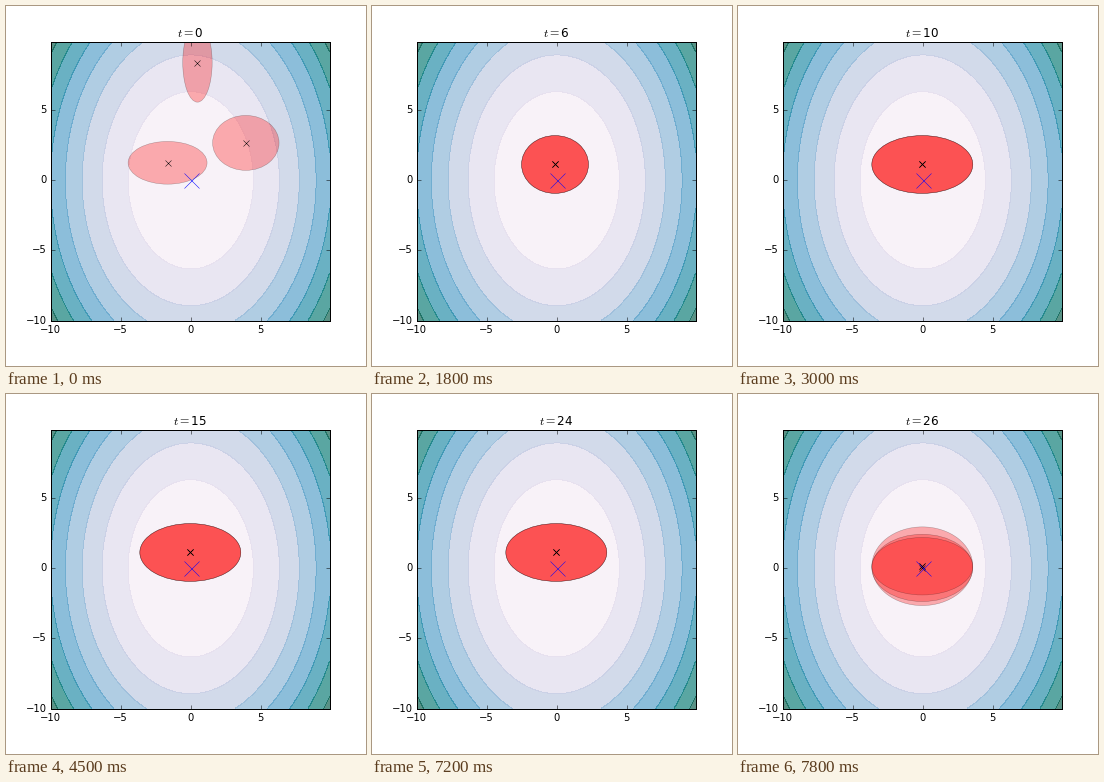
These frames come from a looping animation (360x360 px, 8000 ms). A matplotlib script:

```python
import numpy as np
import matplotlib.pyplot as plt
from matplotlib.animation import FuncAnimation
from matplotlib.patches import Ellipse

plt.style.use("classic")
plt.rcParams.update({
    "font.family": "DejaVu Sans",
    "font.size": 10,
    "savefig.dpi": "figure",
    "savefig.facecolor": "white",
})

STAGE = 360      # px
STEP_TICKS = 3   # animation ticks per iteration
INTERVAL = 100   # ms per tick
WIDEN_AT, DROP_AT = 8, 26

# Each particle: centre, size, and share of its offset kept per iteration
PARTICLES = [((-1.65, 1.25), (5.63, 3.05), 0.40),
             ((0.48, 8.40), (2.10, 5.65), 0.0),
             ((3.93, 2.67), (4.74, 3.92), 0.22)]
BEST, BEST_SIZE = np.array((-0.12, 1.13)), np.array((4.77, 4.12))


def particle(k, t):
    """Centre and size of particle k at iteration t."""
    centre, size, keep = PARTICLES[k]
    if t == 0:
        return centre, size
    if t >= DROP_AT:
        return (-0.03, 0.09 + 0.06 * (-1) ** k), (7.2, 4.1 * 1.17 ** (2 - k))
    if t >= WIDEN_AT:
        return (-0.03, BEST[1]), (7.2, BEST_SIZE[1])
    offset = (np.array(centre) - BEST) * keep ** t
    # Ellipses are flatter the further they are from the best one
    flatten = 1 + abs(offset[0]) * np.array((0.08, -0.24))
    return BEST + offset, BEST_SIZE * flatten


fig = plt.figure(figsize=(5, 5), dpi=72, facecolor="white")
# Just under half a pixel, so that ticks and markers round up and left
nudge = 0.48 / STAGE
ax = fig.add_axes([0.125 - nudge, 0.125 + nudge, 0.775, 0.775])

axis = np.arange(-10, 10, 0.1)
X, Y = np.meshgrid(axis, axis)
ax.contourf(X, Y, 2 * X**2 + Y**2, levels=np.arange(0, 321, 40),
            cmap="PuBuGn", vmin=0, vmax=320, alpha=0.65)
ax.set(xlim=(-10, 9.9), ylim=(-10, 9.9),
       xticks=range(-10, 6, 5), yticks=range(-10, 6, 5))

ellipses = [ax.add_patch(Ellipse((0, 0), 1, 1, facecolor="red",
                                 edgecolor="black", linewidth=0.5, alpha=0.3))
            for _ in PARTICLES]
centres = [ax.plot([], [], "kx", markersize=6)[0] for _ in PARTICLES]
ax.plot([0], [0], "bx", markersize=15)
title = ax.set_title("", fontsize=12)


def update(tick):
    t = tick // STEP_TICKS
    title.set_text(f"$t=${t}")
    for k, (ellipse, mark) in enumerate(zip(ellipses, centres)):
        (x, y), (w, h) = particle(k, t)
        ellipse.set(center=(x, y), width=w, height=h)
        mark.set_data([x], [y])
    return [title, *ellipses, *centres]


anim = FuncAnimation(fig, update, frames=80, interval=INTERVAL,
                     repeat=True, repeat_delay=0)
plt.show()
```
